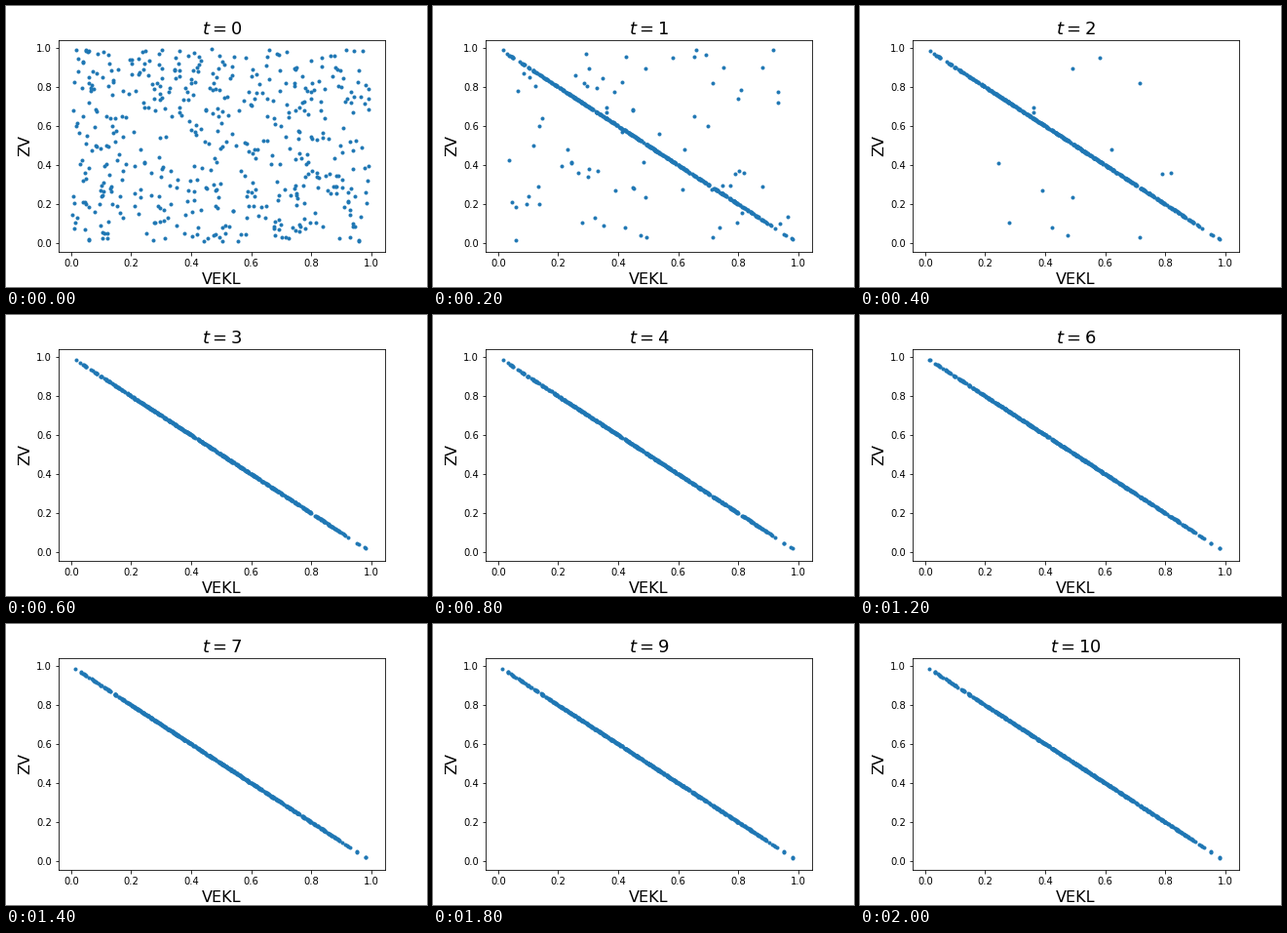
These frames come from a looping animation (432x288 px, 2.2 s). A matplotlib script:

```python
import numpy as np
import matplotlib.pyplot as plt
from matplotlib.animation import FuncAnimation

N, STEPS, INTERVAL = 500, 11, 200
LATE_SHARE = 0.145

# The points that take longest to reach the line.
SLOWEST = [(0.49, 0.895), (0.715, 0.82), (0.36, 0.695), (0.36, 0.67),
           (0.582, 0.95), (0.62, 0.48), (0.79, 0.355), (0.82, 0.36),
           (0.244, 0.41), (0.39, 0.27), (0.28, 0.105), (0.423, 0.08),
           (0.475, 0.04), (0.49, 0.235), (0.716, 0.03)]


def build_states(seed):
    rng = np.random.default_rng(seed)
    start = rng.uniform(0.003, 0.997, (N, 2))
    start[:len(SLOWEST)] = SLOWEST
    x, y = start.T

    settle = 1 + (rng.random(N) < LATE_SHARE)
    settle[:len(SLOWEST)] = 3

    # Each point lands on x + y = 1, then drifts a little along it.
    s = (x / (x + y) + (1 + x - y) / 2) / 2
    states = [start]
    for t in range(1, STEPS):
        drift = rng.normal(0, 0.008, N) * (rng.random(N) < 0.2)
        s = np.clip(s + drift, 0.003, 0.997)
        line = np.column_stack([s, 1 - s])
        states.append(np.where((settle <= t)[:, None], line, start))
    return states


states = build_states(seed=12)

fig, ax = plt.subplots(figsize=(6, 4), dpi=72)
fig.subplots_adjust(left=0.125, right=0.9, bottom=0.125, top=0.88)
dots, = ax.plot([], [], ".", color="#1f77b4", markersize=6)
ax.set_xlim(-0.042, 1.046)
ax.set_ylim(-0.045, 1.0422)
ax.set_xlabel("VEKL", fontsize=16)
ax.set_ylabel("ZV", fontsize=16)
title = ax.set_title("$t=0$", fontsize=18)


def draw(t):
    dots.set_data(*states[t].T)
    title.set_text(f"$t={t}$")
    return dots, title


anim = FuncAnimation(fig, draw, frames=STEPS, interval=INTERVAL, repeat=True)
plt.show()
```
